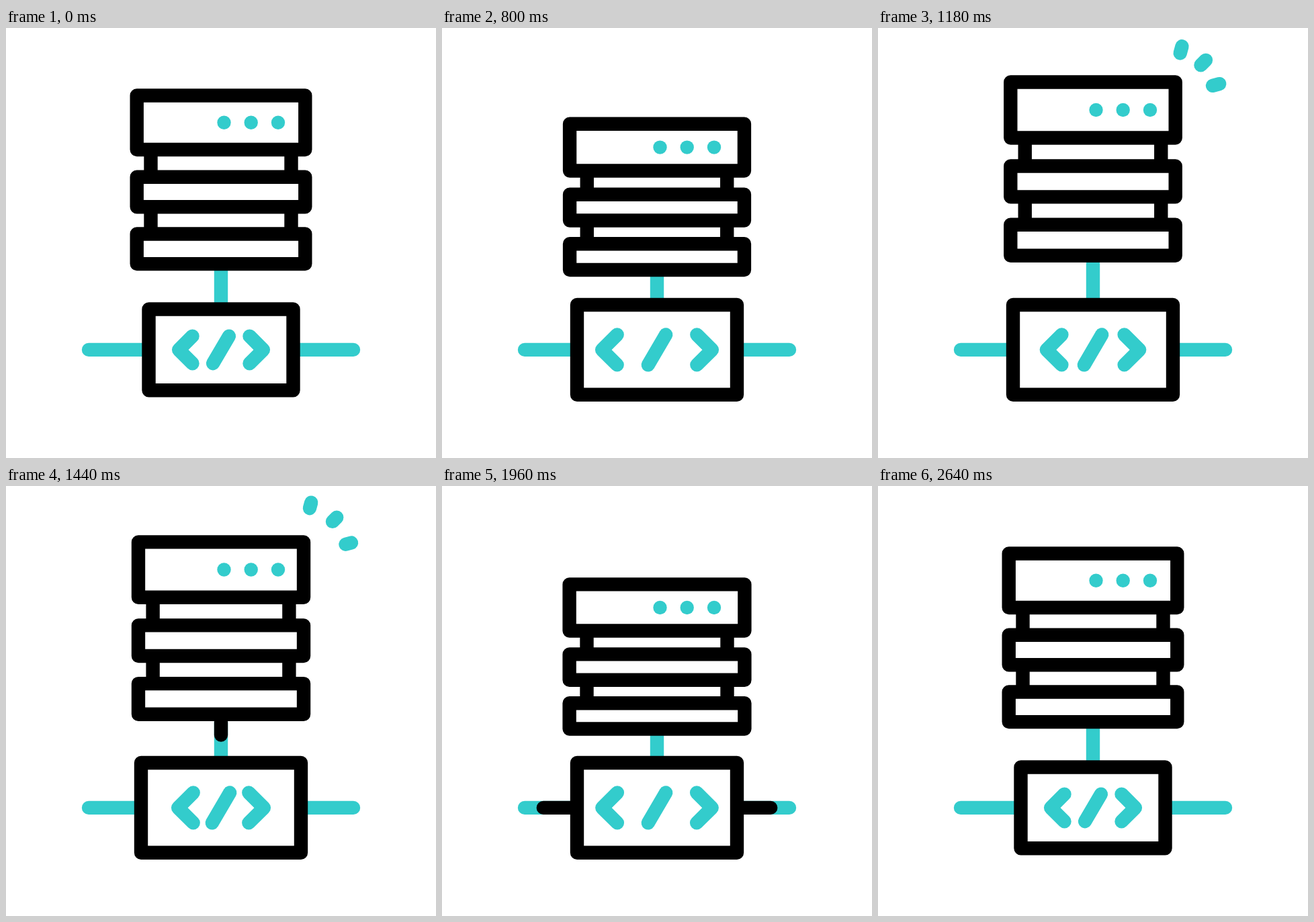
Write an HTML page with a canvas that moves like this. It is 640 px wide and 640 px high and loops after 3000 ms.

```html
<!DOCTYPE html>
<html lang="en">
<head>
<meta charset="utf-8">
<title>Server and code</title>
<style>
  html, body { margin: 0; width: 100%; height: 100%; overflow: hidden; background: #fff; }
  canvas { display: block; width: 640px; height: 640px; }
</style>
</head>
<body>
<canvas id="stage" width="640" height="640"></canvas>
<script>
const ctx = document.getElementById('stage').getContext('2d');
const TEAL = '#33cccc', BLACK = '#000', LOOP = 3000, CX = 320, CY = 478.9;

const smooth = u => u * u * (3 - 2 * u);
const mix = (a, b, u) => a + (b - a) * u;
const ramp = (t, start, end) => smooth(Math.min(1, Math.max(0, (t - start) / (end - start))));

// Eased value through a list of [time, value] keys
function track(t, keys) {
  let value = keys[0][1];
  for (let i = 1; i < keys.length; i++) {
    const [start, from] = keys[i - 1], [end, to] = keys[i];
    if (t > start) value = mix(from, to, ramp(t, start, end));
  }
  return value;
}

function line(color, ...points) {
  ctx.strokeStyle = color;
  ctx.beginPath();
  points.forEach(([x, y]) => ctx.lineTo(x, y));
  ctx.stroke();
}

function panel(halfWidth, top, bottom) {
  ctx.fillStyle = '#fff';
  ctx.strokeStyle = BLACK;
  ctx.beginPath();
  ctx.rect(CX - halfWidth, top, halfWidth * 2, bottom - top);
  ctx.fill();
  ctx.stroke();
}

// The part of a segment between two fractions of its length
function trimmed(color, [x0, y0], [x1, y1], from, to) {
  if (to - from < 0.001) return;
  const at = u => [mix(x0, x1, u), mix(y0, y1, u)];
  line(color, at(from), at(to));
}

function drawCables(t) {
  const cables = [
    [[CX, 351.5], [CX, 418.5], 1300],
    [[223, CY], [123, CY], 1700],
    [[417, CY], [517, CY], 1700]
  ];
  for (const [a, b, start] of cables) {
    line(TEAL, a, b);
    trimmed(BLACK, a, b, ramp(t, start + 200, start + 600), ramp(t, start, start + 400));
  }
}

function drawServer(t) {
  const pose = (rest, squash, peak) =>
    track(t, [[200, rest], [700, squash], [1300, peak], [1900, squash], [2400, rest]]);
  const base = pose(351.1, 361.9, 336.1);
  const scale = pose(1, 0.852, 1.0506);
  const half = pose(125.3, 130.6, 121.8);
  const post = pose(104.5, 104.5, 100.9);
  const y = height => base - scale * height;

  for (const side of [-1, 1])
    line(BLACK, [CX + side * post, y(240)], [CX + side * post, y(20)]);
  for (const [top, bottom] of [[250.6, 170.1], [129.4, 84.8], [44.6, 0]])
    panel(half, y(top), y(bottom));

  ctx.fillStyle = TEAL;
  for (const x of [324.5, 364.7, 405]) {
    ctx.beginPath();
    ctx.arc(x, y(210.35), 10.2, 0, Math.PI * 2);
    ctx.fill();
  }
  drawSparks(t, CX + half + 10.2, y(250.6) - 10.2);
}

function drawSparks(t, x, y) {
  const from = ramp(t, 1300, 1600), to = ramp(t, 1000, 1300), length = 16.2;
  for (const [dx, dy, degrees] of [[1, -48.5, 75], [39, -26.5, 45], [60.8, 11.3, 15]]) {
    const a = degrees * Math.PI / 180, tip = [x + dx, y + dy];
    const root = [tip[0] - length * Math.cos(a), tip[1] + length * Math.sin(a)];
    trimmed(TEAL, root, tip, from, to);
  }
}

function drawCode(t) {
  const scale = track(t, [[200, 1], [800, 1.107], [2000, 1.107], [2600, 1]]);
  const spread = track(t, [[200, 62.9], [800, 74], [1400, 57.5], [2000, 74], [2600, 62.9]]);
  const at = (x, y) => [CX + x * scale, CY + y * scale];

  panel(107.5 * scale, CY - 60.4 * scale, CY + 60.4 * scale);
  for (const side of [-1, 1]) {
    const arm = side * (spread - 20.4);
    line(TEAL, at(arm, -20.3), at(side * spread, 0), at(arm, 20.3));
  }
  line(TEAL, at(-11.9, 20.3), at(11.9, -20.3));
}

function draw(now) {
  const t = now % LOOP;
  ctx.clearRect(0, 0, 640, 640);
  ctx.lineWidth = 20.4;
  ctx.lineCap = ctx.lineJoin = 'round';
  drawCables(t);
  drawServer(t);
  drawCode(t);
  requestAnimationFrame(draw);
}
draw(performance.now());
</script>
</body>
</html>
```
